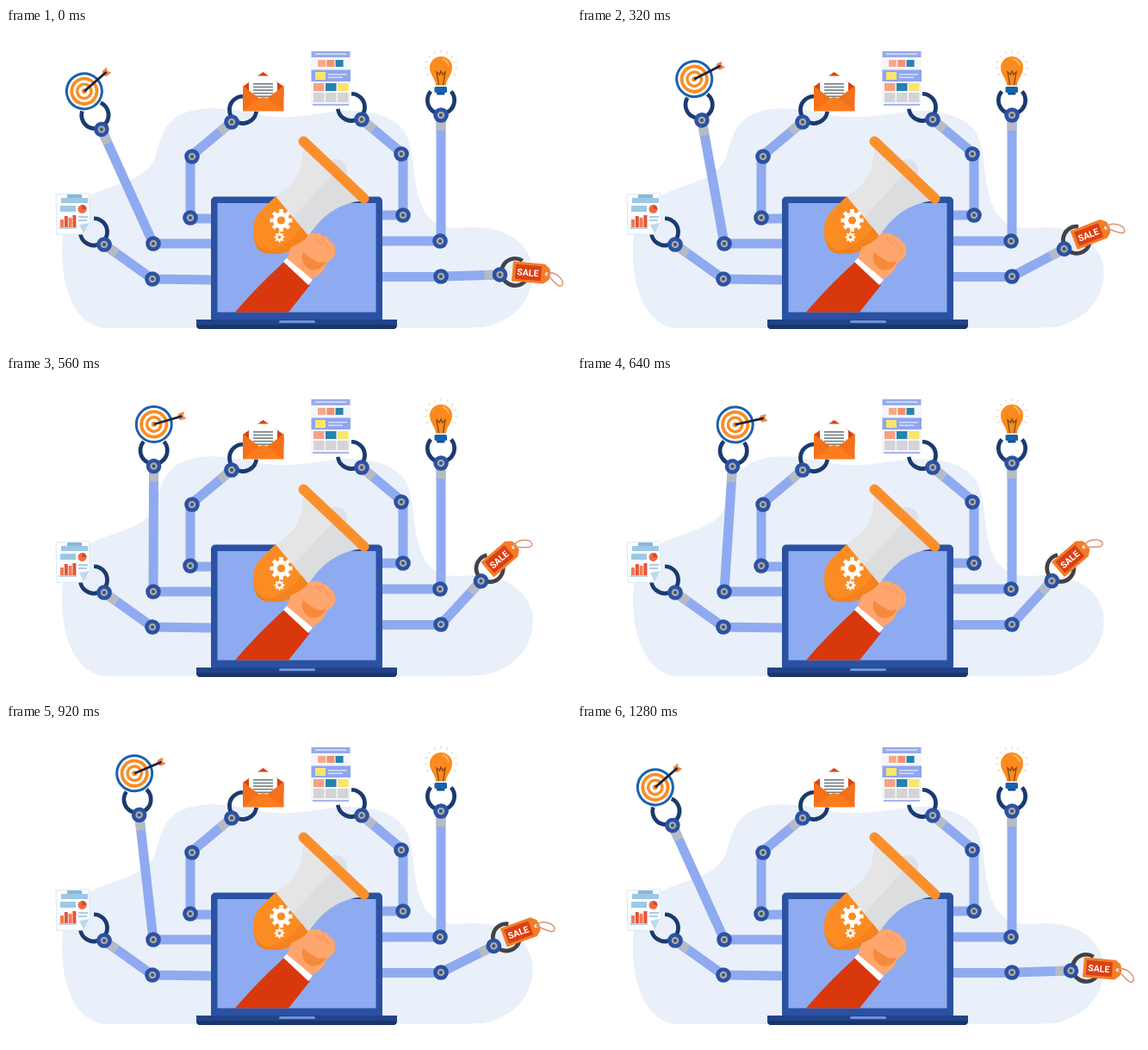
An HTML page that plays this animation: 656 px wide and 371 px high, repeating every 1.36 s.

```html
<!DOCTYPE html>
<html lang="en">
<head>
<meta charset="utf-8">
<title>Marketing automation</title>
<style>
html, body { margin: 0; width: 100%; height: 100%; overflow: hidden; background: #fff; }
svg { display: block; width: 656px; height: 371px; }
text { font: 700 10.5px Roboto, sans-serif; text-anchor: middle; fill: #fff; }
</style>
</head>
<body>
<svg id="stage" viewBox="0 0 656 371" xmlns="http://www.w3.org/2000/svg"></svg>
<script>
const BAR = '#8faaf0', BLUE = '#2b51a2', NAVY = '#1b3a70', ORANGE = '#fb8c23';

const rect = (x, y, w, h, fill, more = '') =>
  `<rect x="${x}" y="${y}" width="${w}" height="${h}" fill="${fill}" ${more}/>`;
const dot = (x, y, r, fill) => `<circle cx="${x}" cy="${y}" r="${r}" fill="${fill}"/>`;
const ring = (r, color, w) => `<circle r="${r}" fill="none" stroke="${color}" stroke-width="${w}"/>`;
const path = (d, fill, more = '') => `<path d="${d}" fill="${fill}" ${more}/>`;
const line = (d, color, w, more = '') => path(d, 'none', `stroke="${color}" stroke-width="${w}" ${more}`);
const group = (transform, body, id = '') => `<g id="${id}" transform="${transform}">${body}</g>`;

const joint = (x, y) => dot(x, y, 8.8, BLUE) + dot(x, y, 4.3, '#a5aab0') + dot(x, y, 2, '#4c525c');

// A crescent that opens upwards before rotation
const claw = (x, y, turn, color = NAVY) => group(`translate(${x} ${y}) rotate(${turn})`,
  path('M-13.500 -12A18 18 0 1 0 13.500 -12L10 -9A13.300 13.300 0 1 1 -10 -9Z', color));

// Bars along the points, with a grey sleeve just before the last one
function bars(...pts) {
  const [[ax, ay], [bx, by]] = pts.slice(-2);
  const len = Math.hypot(bx - ax, by - ay);
  const at = d => `${bx + (ax - bx) * d / len} ${by + (ay - by) * d / len}`;
  return line('M' + pts.join('L'), BAR, 11) + line(`M${at(8)}L${at(18)}`, '#b5bbc5', 11);
}
const joints = (...pts) => pts.map(p => joint(...p)).join('');

function gear(x, y, r, teeth, hole) {
  let s = '';
  for (let i = 0; i < teeth; i++)
    s += rect(-r * .24, -r * 1.36, r * .48, r * .6, '#fff', `transform="rotate(${i * 360 / teeth})"`);
  return group(`translate(${x} ${y})`, s + dot(0, 0, r, '#fff') + dot(0, 0, hole, ORANGE));
}

const blob = path('M112 348C82 342 65 306 65 260C65 220 78 202 104 191C136 178 164 174 173 150C179 130 182 113 200 102' +
  'C222 90 254 92 286 99C318 107 344 102 374 98C412 92 447 99 462 119C475 140 471 172 481 202C488 222 502 233 528 232' +
  'C572 227 604 243 611 275C616 311 592 340 554 347L520 348Z', '#e9f0f9');

const laptop = rect(238, 195.5, 199, 146, BLUE, 'rx="5"') + rect(245.5, 203, 184, 126.5, '#8eabf1') +
  path('M221 338H454V344Q454 349 449 349H226Q221 349 221 344Z', '#21438a') +
  path('M221 344H454Q454 349 449 349H226Q221 349 221 344Z', '#1a3668') +
  rect(317, 339, 42, 3, '#6f93dc', 'rx="1.5"');

const megaphone =
  dot(383, 165, 13, '#dde2e8') +
  path('M345 134L415 200C388 203 368 215 350 243L313 196C339 179 346 163 345 134Z', '#dcdddf') +
  path('M345 134L381 168L332 221L313 196C339 179 346 163 345 134Z', '#e5e5e6') +
  path('M287 243L292 256Q300 263 308 261.500L312 259Z', '#f07d18') +
  path('M313 195L351 241C341 253 329 261 315 262Q303 262 295 254Q286 246 287 235Q287 222 293 215Z', ORANGE) +
  path('M351 241C341 253 329 261 315 262Q306 262 300 259C323 254 335 244 343 231Z', '#f5821c') +
  line('M345.500 131.500L415.500 197.500', '#fb8f2b', 12, 'stroke-linecap="round"') +
  gear(319.5, 223, 9.6, 8, 4.6) + gear(317.5, 242.5, 4.3, 8, 2);

const hand =
  path('M266 329.500Q291 300 323 271L353 298L328 329.500Z', '#d8380c') +
  path('M322 271L327 265.500L356 292L351 298Z', '#fff') +
  path('M326 267L331 254Q342 250 349 243Q353 236 359 238Q365 237 367 241Q375 241 376 247Q382 249 382 256' +
    'Q384 264 377 269Q370 273 370 278Q366 286 355 291Z', '#ffa66e') +
  path('M345 260Q342 267 346 274Q352 283 361 280Q369 278 371 270Q364 274 358 269Q351 266 345 260Z', '#f68a3c') +
  line('M359 243L367 251M367 244L375 255', '#f7975a', 1.2);

function envelope() {
  let s = path('M275 68L298.500 51L322.500 68V80H275Z', '#d9430e') + path('M282 63L290 55.500H307L315 63V86H282Z', '#fff');
  for (let y = 64; y < 82; y += 3.6) s += rect(287, y, 23, 1.7, '#778385');
  return s + path('M275 67L298.500 85L275 96.500Z', '#f4701a') + path('M322.500 67L298.500 85L322.500 96.500Z', '#f4701a') +
    path('M275 96.500L294 81.500Q298.500 79 303 81.500L322.500 96.500Z', '#fb7d1e');
}

function page() {
  let s = rect(354, 26, 46, 64, '#f4f6fc') + rect(354.5, 27, 45, 7, '#98aaea') +
    rect(359, 29.5, 36, 1.4, '#dfe6ff') + rect(354.5, 48.5, 45.5, 13.5, '#8fa5ed') + rect(359, 51, 12, 9, '#fbe56b') +
    rect(374, 53, 22, 1.5, '#d5dffc') + rect(374, 56.5, 17, 1.5, '#d5dffc') + rect(356, 88, 42, 2, '#a8b6ec');
  ['#f6a98a', '#f39272', '#2683ad'].forEach((c, i) => s += rect(362 + i * 10.3, 37, 9, 8, c));
  ['#f5a184', '#2683ad', '#fbe56b'].forEach((c, i) => {
    const x = 357 + i * 14;
    s += rect(x, 64, 12.5, 9, c) + rect(x, 75, 12.5, 11, '#d4d4d6');
  });
  return s;
}

function report() {
  let s = path('M58 193L96 191.500L98 229L89 239L59 239.500Z', '#fbfdfe', 'stroke="#d9e9f5"') +
    rect(71, 193, 17, 5, '#86b7da', 'rx="1"') +
    rect(64, 197, 31, 6, '#9dc8e5') + rect(63, 206, 18, 7, '#9dc8e5') + dot(88.5, 210, 5, '#f2693c') +
    path('M88.500 210V205A5 5 0 0 1 93.500 210Z', '#d9472b') + rect(84, 218, 11, 2, '#a9cee7') +
    rect(84, 222, 10, 2, '#a9cee7') + path('M85 228L97 226L90 238Z', '#bcdaee');
  [9, 13, 11, 14].forEach((h, i) => s += rect(63 + i * 4.8, 231 - h, 4, h, i % 2 ? '#e5533a' : '#f27a52'));
  return s + line('M61.500 232H82', '#7aa9c9', 1);
}

function bulb() {
  let s = '';
  for (let a = -120; a <= 120; a += 24)
    s += line('M0 -16V-19.500', '#ead5a6', 1, `transform="translate(505 45) rotate(${a})"`);
  return s + path('M499 66.500C499 59 492 55 492 45.500A13 12.500 0 0 1 518 45.500C518 55 511 59 511 66.500Z', '#fb8b1e') +
    line('M507 36Q513 38 514 44', '#ffb668', 1.6) +
    line('M502.500 66L500 51L503.500 54L505 50L507 54L510 51L507.500 66', '#8a4a17', 1.4) +
    rect(497.5, 68, 14.5, 7, '#1762ae', 'rx="1.5"') + rect(500, 75, 9.5, 2.5, '#124c8a', 'rx="1"');
}

// Upright arm, drawn from its pivot
const targetArm = bars([0, 0], [0, -145.5]) + claw(0, -163.5, 0) + joint(0, -145.5) +
  group('translate(0 -194)', dot(0, 0, 22, '#fff') + ring(20.5, '#1c61ab', 3) + ring(14.6, ORANGE, 3.8) +
    ring(8.2, ORANGE, 3.4) + dot(0, 0, 3, ORANGE) +
    group('rotate(-16.5)', path('M28 0L31 -4H38L35.500 0L38 4H31Z', '#f0874a') + line('M0 0H34', '#1b2440', 2.8)));

// Level arm, drawn from its pivot
const saleArm = bars([0, 0], [68.5, 0]) + claw(86, -2.5, 84, '#434246') + joint(68.5, 0) +
  group('translate(101 -1.500) rotate(6.500)',
    path('M-17 -11.500H19L25 -6.500Q27.500 0 25 6.500L19 11.500H-17Q-18 11.500 -18 10V-10Q-18 -11.500 -17 -11.500Z', '#f37c28') +
    rect(-14.5, -8.5, 30, 17, '#dc4013') + dot(22, 0, 2, '#fff') +
    line('M22 0C30 -6 44 5 41 11C38 16 31 8 22 0', '#dd9473', 1.5) +
    '<text y="3.800">SALE</text>');

document.getElementById('stage').innerHTML = rect(0, 0, 656, 371, '#fff') + blob +
  bars([240, 221], [214, 221], [214, 149], [262, 109]) + claw(275, 95, 48) +
  joints([214, 220], [216, 149], [262, 109]) + envelope() +
  bars([436, 217], [461, 217], [461, 146], [413, 106]) + claw(401, 92, -48) +
  joints([461, 217], [459, 146], [413, 106]) + page() +
  bars([436, 247], [505, 247], [505, 101]) + claw(505, 84, 0) + joints([504, 247], [505, 101]) + bulb() +
  bars([240, 292], [170, 291], [114, 251]) + claw(102, 236.5, -48) + joints([170, 291], [114, 251]) + report() +
  line('M240 250H171M436 288.500H505', BAR, 11) +
  group('', targetArm, 'left') + group('', saleArm, 'right') +
  joints([171, 250], [505, 288]) + laptop + megaphone + hand;

const left = document.getElementById('left'), right = document.getElementById('right');
const LOOP = 1360, STEP = 40, END = 1280;
const leftKeys = [[0, -24.4], [680, 5.5], [END, -24.4]];
const rightKeys = [[0, -1.7], [600, -50.5], [920, -26.5], [1120, -11.7], [END, -1.7]];

function tween(keys, t) {
  const i = Math.max(1, keys.findIndex(k => k[0] >= t));
  const [t0, a] = keys[i - 1], [t1, b] = keys[i];
  return a + (b - a) * (t - t0) / (t1 - t0);
}

function draw(ms) {
  const t = Math.min(END, Math.floor(ms % LOOP / STEP) * STEP);
  left.setAttribute('transform', `translate(171 250) rotate(${tween(leftKeys, t)})`);
  right.setAttribute('transform', `translate(505 288) rotate(${tween(rightKeys, t)})`);
}

let start;
function tick(now) {
  start ??= now;
  draw(now - start);
  requestAnimationFrame(tick);
}
draw(0);
requestAnimationFrame(tick);
</script>
</body>
</html>
```
